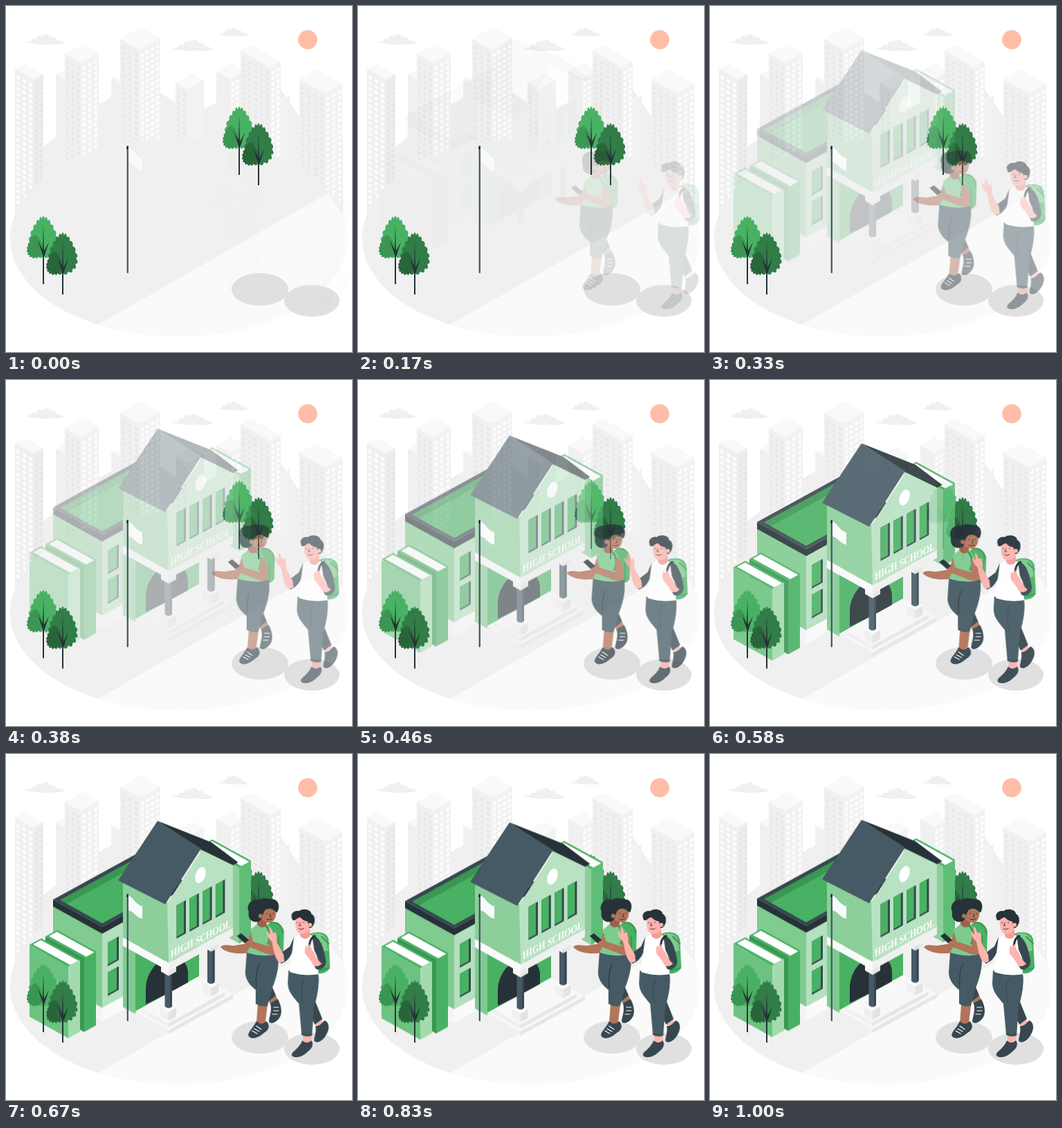
Recreate the animation shown at these times as an HTML page. Size 500x500 px, loop 1.04 s.

```html
<!DOCTYPE html>
<html lang="en">
<head>
<meta charset="utf-8">
<title>School day</title>
<style>
html, body { margin: 0; width: 100%; height: 100%; overflow: hidden; background: #fff; }
svg { display: block; width: 100vw; height: 100vh; }
.in { animation: arrive 1040ms infinite; }
.down { --y: -29.8px; }
.right { --x: -29.8px; }
.left { --x: 29.8px; }
@keyframes arrive {
  from {
    opacity: .008;
    transform: translate(var(--x, 0px), var(--y, 0px));
    animation-timing-function: cubic-bezier(.344, .094, .499, 1.367);
  }
  92.1%, to { opacity: 1; transform: translate(0px, 0px); }
}
.sign { font: bold 16px "Liberation Serif", "Noto Serif", serif; fill: #fff; }
.ln { fill: none; stroke-linecap: round; stroke-linejoin: round; }
</style>
</head>
<body>
<svg viewBox="0 0 500 500">
  <defs>
    <path id="cloud" d="M0,13 C4,10 8,12 9,9 C10,6 14,7 16,7 C17,2 22,1 25,3 C29,-2 36,1 37,5 C42,3 45,6 45,9 C50,8 53,11 57,13 C50,15 42,17 34,14 C27,18 15,13 0,13Z" fill="#f0f0f0"/>
    <clipPath id="disc"><ellipse cx="250" cy="336" rx="244" ry="142"/></clipPath>
    <g id="trees"></g>
  </defs>

  <path d="M13,230 L55,203 134,142 165,125 H223 L246,141 286,149 340,120 H397 L424,160 487,195 V300 H13Z" fill="#f0f0f0"/>
  <g clip-path="url(#disc)">
    <path d="M0,180 H500 V480 H0Z" fill="#fafafa"/>
    <path d="M0,180 H500 V250.500 L134,460 0,480Z" fill="#f0f0f0"/>
  </g>
  <g id="city"></g>
  <circle cx="436" cy="48.700" r="13.800" fill="#ffbda7"/>
  <use href="#cloud" x="27.500" y="40.500"/>
  <use href="#cloud" transform="translate(240 48.500) scale(1.04 1.08)"/>
  <use href="#cloud" transform="translate(306 31) scale(.78 .86)"/>
  <use href="#trees" x="337" y="146"/>

  <g class="in down"><g class="in down" id="school"></g></g>

  <use href="#trees" x="54" y="304"/>
  <path d="M177,205 C184,206 187,218 197,220 V238 C188,237 185,227 177,226Z" fill="#fafafa"/>
  <path d="M175.800,203 V385" class="ln" stroke="#455a64" stroke-width="2.300"/>
  <path d="M175.500,203 V207" stroke="#263238" stroke-width="2.500"/>
  <ellipse cx="367" cy="409.500" rx="41" ry="23.500" fill="#e0e0e0"/>
  <ellipse cx="442" cy="426" rx="40" ry="23" fill="#e0e0e0"/>

  <!-- girl -->
  <g class="in right">
    <path d="M376,247 C385,240 399,244 401,257 L400,287 C397,294 389,296 380,291Z" fill="#48b163"/>
    <path d="M382,244 C392,242 398,248 399,258 M393,264 V290" class="ln" stroke="#3a9653" stroke-width="2"/>
    <path d="M309,279 C314,274 322,277 328,277 L347,274 353,256 363,262 358,286 C346,289 320,291 309,279Z" fill="#b3745a"/>
    <path d="M371,343 L381,361 392,356 384,336Z" fill="#b3745a"/>
    <path d="M381,360 L392,354 C398,365 399,377 393,383 C388,389 381,391 379,386 C380,378 384,371 381,360Z" fill="#37474f"/>
    <path d="M363,362 L361,390 C366,396 372,394 374,388 L377,364Z" fill="#b3745a"/>
    <path d="M361,386 C366,391 371,391 375,386 C381,391 380,399 372,403 C363,411 354,413 350,408 C347,403 356,397 361,386Z" fill="#37474f"/>
    <path d="M361,393 L368,398 M358,397 L365,401 M355,400 L362,404 M386,366 H393 M386,371 H393 M384,376 H391" class="ln" stroke="#fff" stroke-width="1.200"/>
    <path d="M347,288 L392,289 C395,308 389,326 383,336 L389,349 379,357 372,345Z" fill="#37474f"/>
    <path d="M347,287 L391,289 C394,310 389,326 384,338 L377,364 Q368,366 360,361 L360,341 C350,333 345,325 345,315Z" fill="#455a64"/>
    <path d="M366,303 C361,308 360,327 361,338" class="ln" stroke="#263238"/>
    <path d="M352,254 L363,245 378,247 385,257 380,270 386,290 C374,293 360,291 347,287 L356,270Z" fill="#7dcb8e"/>
    <path d="M374,248 C381,253 382,264 378,274" class="ln" stroke="#3a9653" stroke-width="3"/>
    <path d="M362,236 V246 C367,253 373,251 376,246 V240Z" fill="#9d6049"/>
    <path d="M333,263 L339,259 354,272 349,278Z" fill="#263238"/>
    <path d="M382,256 C390,261 392,275 391,288 C385,292 378,290 372,287 L348,278 344,273 350,269 379,278 379,264Z" fill="#b3745a"/>
    <path d="M368,220 H388 C392,231 388,243 380,244 C371,243 366,238 365,231Z" fill="#b3745a"/>
    <path d="M350,228 C345,218 355,208 364,211 C371,207 379,209 384,210 C393,210 396,220 391,229 C387,228 385,222 377,224 C369,225 372,240 364,242 C355,245 348,238 350,228Z" fill="#263238"/>
    <circle cx="367" cy="234" r="3" fill="#b3745a"/>
    <path d="M376,230 V231 M385,230 V231 M381,231 L382,235 380,235.500 M376,239 Q380,241 384,238" class="ln" stroke="#263238"/>
  </g>

  <!-- boy -->
  <g class="in left">
    <path d="M440,260 C452,255 465,258 467,268 L469,307 C467,316 457,319 447,316Z" fill="#48b163"/>
    <path d="M443,260 C454,257 461,261 464,268 L466,284 450,288Z" fill="#7dcb8e"/>
    <path d="M457,264 L467,274 M454,313 L468,309" class="ln" stroke="#3a9653" stroke-width="2"/>
    <path d="M444,381 L449,394 459,388 454,377Z" fill="#ffb3ad"/>
    <path d="M448,393 C453,394 457,389 461,385 C467,387 469,395 465,403 C461,412 453,418 448,416 C443,414 450,406 448,393Z" fill="#37474f"/>
    <path d="M430,401 V419 C435,422 440,421 442,416 L443,401Z" fill="#ffb3ad"/>
    <path d="M429,414 C433,418 438,418 442,414 C446,419 443,426 437,430 C428,439 418,440 414,436 C412,430 424,427 429,414Z" fill="#37474f"/>
    <path d="M427,318 H452 C454,335 450,350 448,358 L458,383 447,391 432,360Z" fill="#37474f"/>
    <path d="M409,313 L452,317 C454,334 449,353 446,364 L443,407 Q435,410 428,406 L424,361 C414,349 408,342 408,331Z" fill="#455a64"/>
    <path d="M428,404 Q436,407 443,405 M432,325 C427,335 426,348 431,360" class="ln" stroke="#37474f"/>
    <path d="M414,267 L425,261 444,262 450,284 452,318 C438,321 422,319 411,315Z" fill="#fff"/>
    <path d="M417,264 L411,278 395,290 398,303 C405,301 411,295 414,287Z" fill="#37474f"/>
    <path d="M396,302 C389,296 387,281 385,271 C379,266 376,258 378,256 L382,261 381,250 C384,249 385,256 387,259 L390,257 C393,263 392,270 392,272 L402,290 403,300Z" fill="#ffb3ad"/>
    <path d="M443,262 C455,264 460,280 463,298 C464,308 456,313 449,311 L444,302 453,298 446,283Z" fill="#37474f"/>
    <path d="M447,263 C440,266 438,276 440,284" class="ln" stroke="#263238" stroke-width="3"/>
    <path d="M457,303 C451,309 445,308 442,300 L435,291 C431,287 433,281 434,276 L437,280 440,274 443,283 C448,288 449,295 453,299Z" fill="#ffb3ad"/>
    <path d="M426,254 V263 C430,269 438,268 440,262 V250Z" fill="#f59c96"/>
    <path d="M419,234 C418,246 419,259 427,260 C437,261 441,254 441,246 L438,231Z" fill="#ffb3ad"/>
    <path d="M415,240 C410,231 417,226 424,227 C430,222 442,225 442,231 C449,234 448,246 442,251 C438,253 437,247 437,242 C430,241 427,237 426,236 C421,236 419,242 415,240Z" fill="#263238"/>
    <circle cx="440" cy="247" r="3" fill="#ffb3ad"/>
    <path d="M422,243 V244 M431,243 V244 M426,244 L424.500,248 427,248 M424,252 Q427,255 431,252" class="ln" stroke="#263238"/>
  </g>
</svg>
<script>
const byId = id => document.getElementById(id);
const poly = (fill, ...pts) => `<polygon points="${pts.join(' ')}" fill="${fill}"/>`;
const times = (n, make) => Array.from({ length: n }, (_, i) => make(i)).join('');

const K = .55; // slant of every receding edge
const GREEN = '#48b163', DEEP = '#3a9653', MID = '#6cc381', SOFT = '#8ccf9b', PALE = '#b3e0bd';
const SLATE = '#455a64', SHADE = '#37474f', DARK = '#263238', WHITE = '#fff';

// Faces of a box whose nearest top corner is x, y
const leftWall = (x, y, w, h, fill) =>
  poly(fill, [x, y], [x - w, y - K * w], [x - w, y - K * w + h], [x, y + h]);
const rightWall = (x, y, w, h, fill) =>
  poly(fill, [x, y], [x + w, y - K * w], [x + w, y - K * w + h], [x, y + h]);
const lid = (x, y, wl, wr, fill) =>
  poly(fill, [x, y], [x - wl, y - K * wl], [x - wl + wr, y - K * (wl + wr)], [x + wr, y - K * wr]);
const box = (x, y, wl, wr, h, top, l, r) =>
  leftWall(x, y, wl, h, l) + rightWall(x, y, wr, h, r) + lid(x, y, wl, wr, top);

// City: walls and windows reach down to the rim of the ground disc
const rim = x => 336 - 142 * Math.sqrt(1 - ((x - 250) / 244) ** 2);

function windows(x, y, w, slope, cols, color) {
  const lines = times(cols, i => {
    const dx = w * (i + .5) / cols;
    return `<path d="M${dx},8 V${rim(x + dx) - y - slope * dx - 4}"/>`;
  });
  return `<g transform="matrix(1 ${slope} 0 1 ${x} ${y})" stroke="${color}" stroke-width="4.200" stroke-dasharray="4.200 4">${lines}</g>`;
}

function tower(x, y, wl, wr, colsL = 0, colsR = 0, winL = '#e8e8e8', winR = WHITE) {
  const a = x - wl, b = x + wr, ya = y - K * wl, yb = y - K * wr;
  return poly('#f0f0f0', [x, y], [a, ya], [a, rim(a)], [x, rim(x)]) +
    poly(winR === WHITE ? '#f2f2f2' : '#ededed', [x, y], [b, yb], [b, rim(b)], [x, rim(x)]) +
    lid(x, y, wl, wr, '#f9f9f9') +
    windows(a, ya, wl, K, colsL, winL) + windows(x, y, wr, -K, colsR, winR);
}

byId('city').innerHTML =
  tower(85, 106, 13, 10) + tower(165, 111, 13, 5) + tower(397, 137, 2, 13) +
  tower(40, 106, 27, 14, 3, 2, WHITE, '#e5e5e5') +
  tower(108, 82, 23, 26, 3, 3) +
  tower(193, 63, 28, 30, 3, 4) +
  tower(262, 120, 17, 24, 2, 0) +
  tower(324, 105, 20, 21, 0, 3) +
  tower(382, 88, 43, 15, 5, 2) +
  tower(461, 126, 37, 25, 4, 3);

// School
const book = (x, y, h, front, spine) =>
  box(x, y, 56, 17, h, GREEN, front, spine) + lid(x + 3, y - 3 * K, 54, 11.5, WHITE);
const pane = (x, y, w, h) =>
  rightWall(x, y, w, h, SHADE) + rightWall(x, y, w - 3, h - 2.5, GREEN);

const column = (x, y) =>
  box(x, y + 65, 12, 11, 13, '#fafafa', '#f0f0f0', '#e3e3e3') +
  `<path d="M${x - 5.5},${y} h10.500 v57 q-5,5 -10.500,0Z" fill="${SLATE}"/>
   <path d="M${x + 2},${y} h3 v57 l-3,2Z" fill="${SHADE}"/>` +
  box(x, y, 11, 11, 13, '#fafafa', '#f5f5f5', '#e6e6e6');

const wing =
  leftWall(139, 248, 71, 131, '#80cb90') + rightWall(139, 248, 33, 131, PALE) +
  leftWall(139, 365, 10, 20, '#f5f5f5') + rightWall(139, 365, 33, 20, '#fafafa') +
  box(139, 248, 71, 119, 10, SHADE, DARK, DARK) +
  lid(139, 243, 61, 109, DEEP) + lid(139, 243, 51, 109, GREEN) +
  times(2, i => pane(147, 271 + 43 * i, 16, 34));

const porch =
  leftWall(187, 278, 18, 96, '#80cb90') + rightWall(187, 282, 92, 88, GREEN) +
  `<path d="M202,360 V336 C203,314 219,294 238,291 C254,290 263,302 263,316 V330Z" fill="${DARK}"/>` +
  times(2, i => box(235, 397 - 10 * i, 48 - 9 * i, 93 - 12 * i, 6, '#f8f8f8', '#f0f0f0', '#e6e6e6')) +
  times(2, i => column(235 + 61.5 * i, 306 - 35 * i));

const hall =
  leftWall(235, 300, 66, 12, '#fafafa') + rightWall(235, 300, 93, 12, '#f0f0f0') +
  leftWall(235, 214, 66, 86, SOFT) +
  poly('#b8e2c2', [283, 137], [233, 214], [235, 300], [328, 249], [328, 158]) +
  times(4, i => pane(246.5 + 18.8 * i, 217 - 10 * i, 13.5, 48)) +
  `<ellipse cx="281" cy="173.500" rx="7" ry="12" transform="rotate(20 281 173.500)" fill="#fff"/>
   <text class="sign" transform="matrix(.75 -.388 0 1 238 293)">HIGH SCHOOL</text>` +
  poly(DARK, [219, 95], [297, 126], [335.5, 155], [328, 159], [281, 136]) +
  poly(SLATE, [219, 95], [162, 181], [230, 215.5], [282, 135]);

byId('school').innerHTML =
  book(337, 162, 110, SOFT, '#5fbd77') + wing + porch + hall +
  book(113, 293, 107, DEEP, GREEN) + book(90, 305, 104, MID, '#a3dbae');

// Trees: an egg outline with a scalloped edge
function leaf(fill, place = '') {
  const pts = Array.from({ length: 120 }, (_, i) => {
    const a = i / 120 * 2 * Math.PI;
    const lobe = .92 + .14 * Math.abs(Math.sin(9.5 * a + Math.PI / 2));
    const x = 19.5 * Math.sin(a) * (1 - .35 * Math.cos(a)) * lobe;
    return [x.toFixed(1), (30 - 29 * Math.cos(a) * lobe).toFixed(1)];
  });
  return `<g transform="${place}">${poly(fill, ...pts)}</g>`;
}

const tree = (x, y, light, dark, trunk) =>
  `<g transform="translate(${x} ${y})">${leaf(light)}${leaf(dark, 'translate(-12 27) scale(.56)')}
    <path d="M0,12 L1,50 8,37 1,59 V${trunk} H-1 V56 L-8,35 -1,48Z" fill="${DARK}"/></g>`;

byId('trees').innerHTML =
  tree(0, 0, GREEN, DEEP, 98) + tree(28, 24, '#317c47', '#28663a', 89);
</script>
</body>
</html>
```
